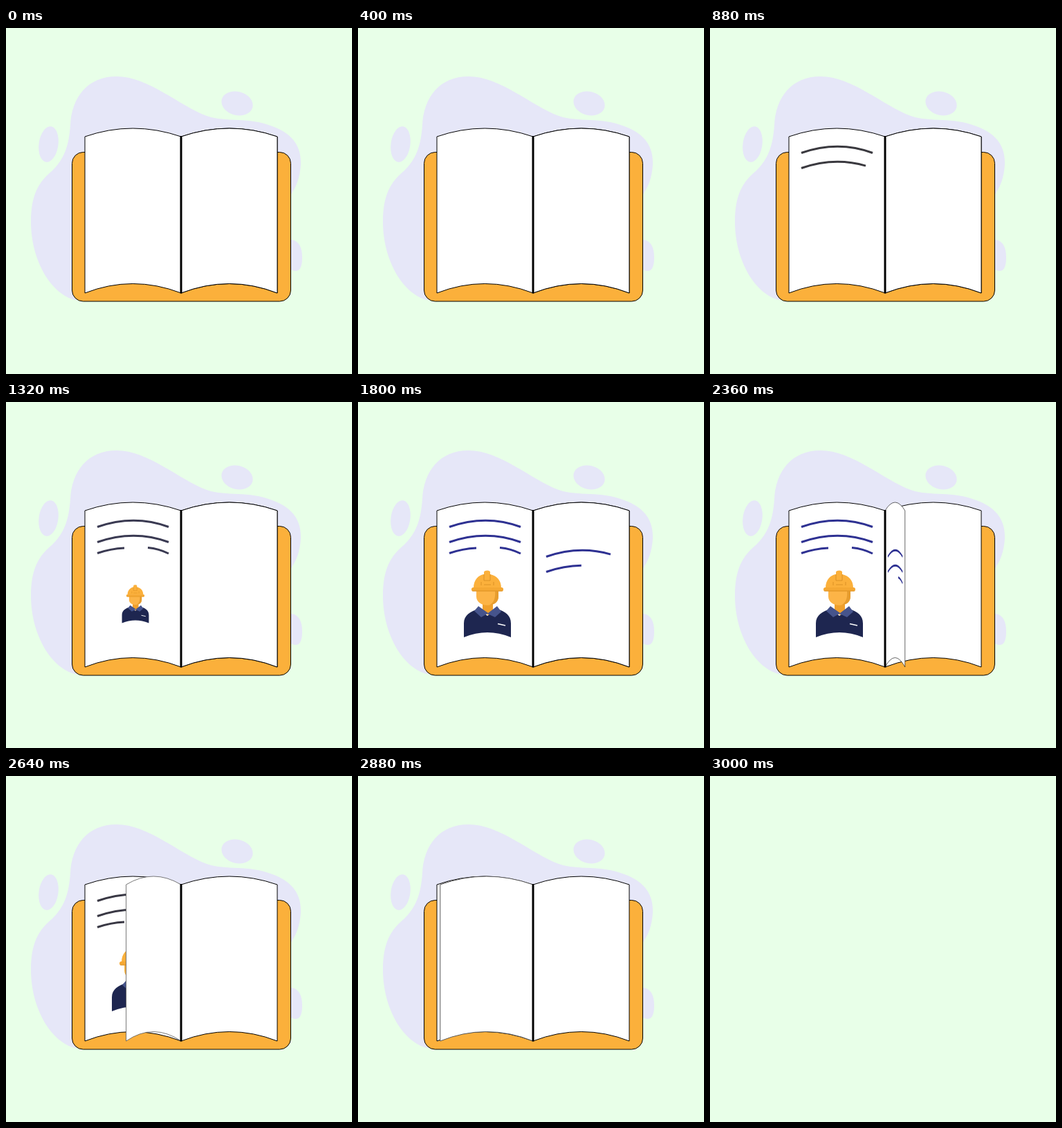
Recreate the animation shown at these times as an HTML page. Size 500 px wide and 500 px high, loop 3.04 s.

```html
<!DOCTYPE html>
<html lang="en">
<head>
<meta charset="utf-8">
<title>Book</title>
<style>
html, body { margin: 0; height: 100%; overflow: hidden; background: #e8ffe8; }
svg { display: block; width: 100vw; height: 100vh; }
.line { fill: none; stroke-width: 3; }
.page { fill: #fff; stroke: #000; }
</style>
</head>
<body>
<svg viewBox="0 0 500 500">
  <defs>
    <path id="sheet" d="M253 157Q323 133 392 157V383Q323 356 253 383Z"/>
  </defs>
  <g id="scene">
    <g fill="#e6e7f8">
      <path d="M100 393C65 385 36 335 36 280C36 235 52 219 66 207C84 190 91 170 93 140C95 100 118 70 160 70C205 70 250 112 290 127C320 137 350 128 385 142C415 153 427 172 426 197C425 215 420 230 410 243L200 380Z"/>
      <ellipse cx="334" cy="109" rx="23" ry="17" transform="rotate(15 334 109)"/>
      <ellipse cx="61.5" cy="168" rx="14" ry="26" transform="rotate(8 61.5 168)"/>
      <path d="M405 306H413C424 308 428 318 428 332C428 346 424 352 417 351L405 347Z"/>
    </g>
    <rect x="95.5" y="179.5" width="316" height="215.5" rx="16" fill="#fbb03b" stroke="#000"/>
    <use href="#sheet" class="page"/>
    <use href="#sheet" class="page" transform="translate(506) scale(-1 1)"/>
    <g id="left"></g>
    <g id="worker">
      <path d="M180 286H195V302L188 308L180 302Z" fill="#f0a02c"/>
      <path d="M171 271H203V281C203 298 171 298 171 281Z" fill="#fcb447"/>
      <path d="M198 272H203V281C203 290 196 293 190 293.500C197 290 199 282 198 272Z" fill="#e69c2e"/>
      <path d="M153 340V320C153 308 162 303 174 299L187 309L201 299C213 303 221 308 221 320V340Q187 326 153 340Z" fill="#1e2650"/>
      <path d="M174 295L168 302L178 311L187 306L198 311L207 303L201 295L188 305Z" fill="#46548c"/>
      <path d="M202 320.500L213 323" stroke="#fff" stroke-width="1.600"/>
      <path d="M167 269C167 256 175 250 182 249V246Q182 243.500 187 243.500Q191 243.500 191 246V249C200 251 207 257 207 269Z" fill="#fbb03b"/>
      <rect x="164" y="268" width="46" height="5.500" rx="2.500" fill="#f5a833"/>
      <path d="M182 249V258H191V249M178 260V265M196 260V265M182 264H192M165 273H209" fill="none" stroke="#d98f25" stroke-width=".9"/>
    </g>
    <g id="flip">
      <use href="#sheet" class="page" id="leaf"/>
      <g id="right"></g>
    </g>
    <path d="M253 156V383.500" stroke="#000" stroke-width="3"/>
  </g>
</svg>
<script>
const LOOP = 3040, STEP = 40;
const $ = id => document.getElementById(id);
const clamp = v => Math.max(0, Math.min(1, v));
const progress = (t, start, length) => clamp((t - start) / length);

const long1 = "M132 180.5Q185 162 235 180.5";
const long2 = "M132 202.5Q185 184 235 202.5";
const shortLeft = "M132 218.5Q151 212 171 211";
const shortRight = "M205 210.5Q221 212 235 219";

function addLine(parent, d, start) {
  const path = document.createElementNS("http://www.w3.org/2000/svg", "path");
  path.setAttribute("d", d);
  path.setAttribute("class", "line");
  path.setAttribute("pathLength", 1);
  parent.append(path);
  return { path, start };
}

$("right").setAttribute("transform", "translate(140 43)");
const lines = [
  addLine($("left"), long1, 697),
  addLine($("left"), long2, 754),
  addLine($("left"), shortLeft, 890),
  addLine($("left"), shortRight, 940),
  addLine($("right"), long1, 1674),
  addLine($("right"), long2, 1731),
  addLine($("right"), shortRight, 1850)
];

function draw(t) {
  $("scene").style.display = t < 3000 ? "" : "none";
  for (const { path, start } of lines) {
    path.setAttribute("stroke-dasharray", `${progress(t, start, 140)} 2`);
  }

  const ink = t < 1160 ? "#3a393f" : t < 1680 ? "#3a3a52" : t < 2440 ? "#2e3192" : "#393844";
  $("left").setAttribute("stroke", ink);
  $("right").setAttribute("stroke", ink);

  const size = progress(t, 1160, 280);
  $("worker").setAttribute("transform", `translate(187 292) scale(${size}) translate(-187 -292)`);

  // The leaf turns about the spine; its back is blank.
  const turn = Math.cos(Math.PI * progress(t, 1893, 1077));
  $("flip").setAttribute("transform", `translate(253) scale(${turn} 1) translate(-253)`);
  $("right").style.display = turn > 0 ? "" : "none";
  $("leaf").style.stroke = turn < 0 && turn > -1 ? "#555" : "#000";
}

function frame() {
  const t = performance.now() % LOOP;
  draw(Math.floor(t / STEP) * STEP);
  requestAnimationFrame(frame);
}
frame();
</script>
</body>
</html>
```
